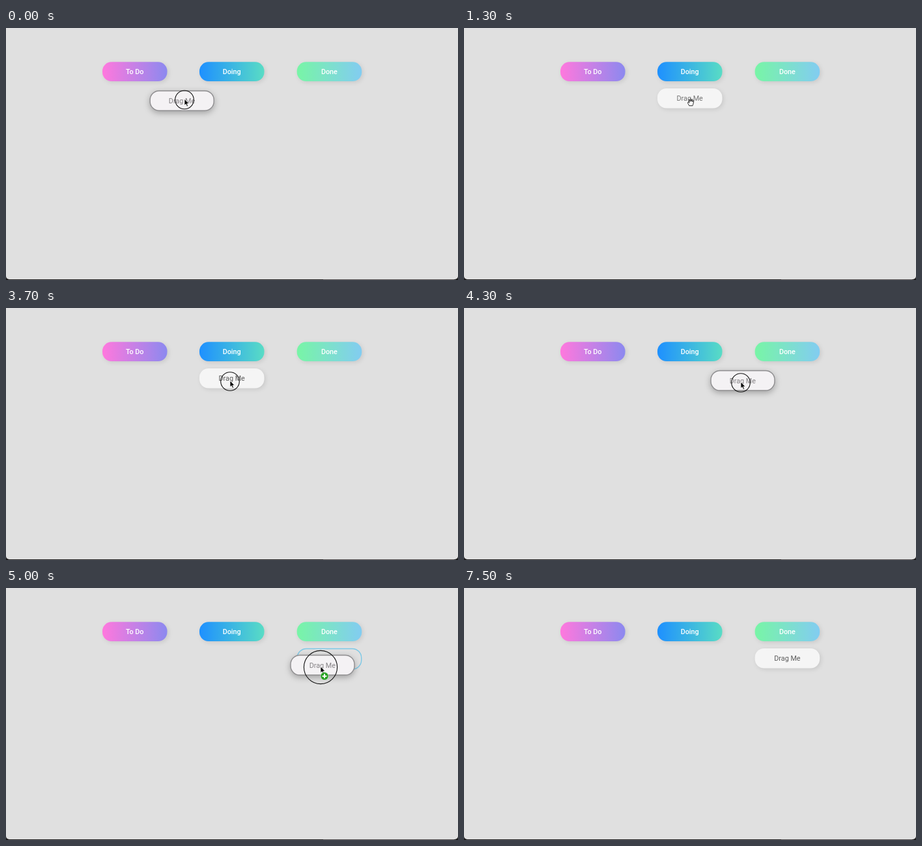
These frames come from a looping animation (694 px wide and 388 px high, 8000 ms). An HTML page:

```html
<!DOCTYPE html>
<html lang="en">
<head>
<meta charset="utf-8">
<title>Drag and drop board</title>
<style>
  html, body { margin: 0; width: 100%; height: 100%; overflow: hidden; background: #e0e0e0; }
  svg { display: block; width: 694px; height: 388px; }
  text { font: 10.8px Roboto, sans-serif; text-anchor: middle; }
  .head text { font-weight: 500; fill: #fff; }
  .soft { filter: drop-shadow(2px 2px 3px rgba(0, 0, 0, .1)); }
  .lifted { filter: drop-shadow(0 3px 5px rgba(0, 0, 0, .28)); }
</style>
</head>
<body>
<svg viewBox="0 0 694 388">
  <defs>
    <linearGradient id="todo"><stop stop-color="#ff78dd"/><stop offset="1" stop-color="#8c89ef"/></linearGradient>
    <linearGradient id="doing"><stop stop-color="#1e90ff"/><stop offset="1" stop-color="#59dcc5"/></linearGradient>
    <linearGradient id="done"><stop stop-color="#78f5a6"/><stop offset="1" stop-color="#82ccf1"/></linearGradient>
  </defs>

  <!-- window with rounded bottom corners -->
  <rect width="694" height="388" fill="#1c1a1b"/>
  <rect x="487" y="387" width="201" height="1" fill="#4a4647"/>
  <path d="M0 0H694V382a5 5 0 0 1-5 5H5a5 5 0 0 1-5-5z" fill="#e0e0e0"/>

  <g id="heads"></g>
  <rect id="slot" y="93.5" width="98.5" height="31.5" rx="14" fill="none" stroke="#7cc8e6" stroke-width="1.4"/>
  <g id="card">
    <rect class="soft" width="99.5" height="30.5" rx="14" fill="#f5f5f5"/>
    <text id="label" x="49.7" y="19">Drag Me</text>
  </g>
  <g id="ghost">
    <rect class="lifted" x=".5" y=".5" width="98" height="30.5" rx="14" fill="#f4f2f4" stroke="#8e8d8f" stroke-width="1.4"/>
    <text x="49.3" y="19.5" fill="#858285">Drag Me</text>
  </g>

  <g id="pointer">
    <circle id="ring" fill="none" stroke="#111" stroke-width="1.1"/>
    <path id="arrow" d="M0-1V8.6L2.2 6.6 3.8 10.2 5.5 9.4 3.9 6H6.9z" fill="#000" stroke="#fff" stroke-width=".7"/>
    <path id="hand" d="M-2.2 5.5C-3 3.2-5.3 1.2-4.4.3-3.6-.4-2.7.5-2 1.2L-3.1-2.8C-3.3-4.2-2-4.4-1.6-3.2L-.9-1-1-4.4C-.9-5.7.5-5.7.7-4.4L.9-1.2 1.6-3.9C2-5 3.2-4.6 3-3.4L2.7-.6 3.5-2.2C4.1-3 5-2.5 4.7-1.5L3.9 2.8C3.6 4 3.2 4.5 3 5.5z"
      fill="#fff" stroke="#111" stroke-width=".9" stroke-linejoin="round"/>
    <g id="plus" transform="translate(6 13.7)">
      <circle r="6" fill="#23a01e" stroke="#cfe3cd" stroke-width=".7"/>
      <path d="M-3.4 0H3.4M0-3.4V3.4" stroke="#fff" stroke-width="1.9"/>
    </g>
  </g>
</svg>
<script>
const LOOP = 8000, STEP = 100, WIDTH = 99.5;
const columns = [
  { x: 148, name: 'To Do', paint: 'todo' },
  { x: 297, name: 'Doing', paint: 'doing' },
  { x: 446.7, name: 'Done', paint: 'done' }
];
// Pointer path: [time, x, y]
const path = [
  [0, 274, 110.5], [700, 332, 110.3], [900, 336, 111], [1400, 351, 115],
  [2900, 351, 115], [3700, 344, 113], [4300, 425, 115], [5000, 483, 122],
  [5400, 490, 122], [5800, 490, 122], [5900, 492.5, 122], [7200, 492.5, 122],
  [7300, 493, 85], [7400, 493, 22]
];
const drags = [
  { from: 0, drop: 800, grabX: 53.3, grabY: 14.3 },
  { from: 3800, drop: 5100, grabX: 46.5, grabY: 19 }
];

const el = id => document.getElementById(id);
const show = (id, on) => el(id).setAttribute('visibility', on ? 'visible' : 'hidden');
const move = (id, x, y) => el(id).setAttribute('transform', `translate(${x} ${y})`);
const between = (t, a, b) => t >= a && t < b;

el('heads').innerHTML = columns.map(({ x, name, paint }) => `
  <g class="head" transform="translate(${x} 52.3)">
    <rect class="soft" width="${WIDTH}" height="29.7" rx="14" fill="url(#${paint})"/>
    <text x="49.7" y="18.9">${name}</text>
  </g>`).join('');

function pointerAt(t) {
  const next = path.findIndex(p => p[0] > t);
  if (next < 0) return path.at(-1).slice(1);
  const [t0, x0, y0] = path[next - 1], [t1, x1, y1] = path[next];
  const k = (t - t0) / (t1 - t0);
  return [x0 + (x1 - x0) * k, y0 + (y1 - y0) * k];
}

function draw(t) {
  const [x, y] = pointerAt(t);
  const drag = drags.find(d => between(t, d.from, d.drop));
  const target = drag && columns.find(c => between(x, c.x, c.x + WIDTH));
  const grabbing = between(t, 1000, 3700) || between(t, 5200, 5900);
  const pressed = drag || t === 3700;
  const released = drag && t === drag.drop - STEP;

  show('card', !drag);
  move('card', columns[t < 3800 ? 1 : 2].x, 93);
  el('label').setAttribute('fill', grabbing ? '#747474' : '#5c5c5c');

  show('ghost', drag);
  if (drag) move('ghost', x - drag.grabX, y - drag.grabY);
  show('slot', target);
  if (target) el('slot').setAttribute('x', target.x + .5);

  move('pointer', x, y);
  show('ring', pressed);
  el('ring').setAttribute('r', released ? 25.6 : 14.3);
  show('hand', grabbing);
  show('arrow', !grabbing && t < 7500);
  show('plus', target);
}

function tick() {
  draw(Math.floor(performance.now() % LOOP / STEP) * STEP);
  requestAnimationFrame(tick);
}
tick();
</script>
</body>
</html>
```
